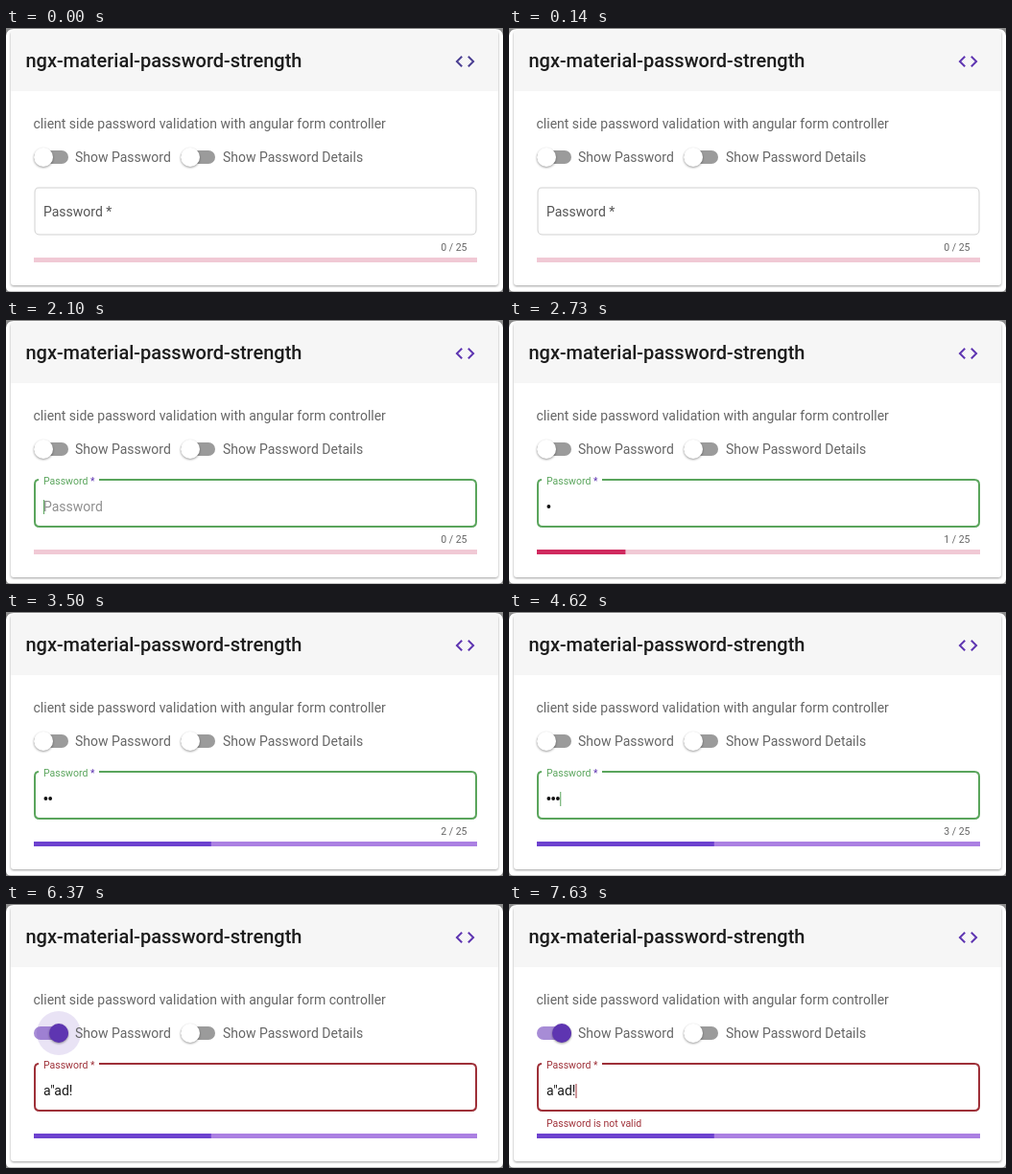
Recreate the animation shown at these times as an HTML page. Size 518 by 276 pixels, loop 8 s.

```html
<!DOCTYPE html>
<html lang="en">
<head>
<meta charset="utf-8">
<title>Password strength</title>
<style>
html, body { margin: 0; width: 100%; height: 100%; overflow: hidden; background: #fff; }
svg { display: block; width: 518px; height: 276px; font: 14px Roboto, Arial, sans-serif; }
.card { filter: drop-shadow(0 1px 1.2px rgba(0,0,0,.38)); }
.thumb { filter: drop-shadow(0 1px 1.2px rgba(0,0,0,.4)); }
.small { font-size: 10.5px; }
.body { fill: #666; }
</style>
</head>
<body>
<svg viewBox="0 0 518 276">
  <rect width="518" height="276" fill="#fff"/>
  <path d="M0 8V0H518V8Q517 1 510 1H8Q1 1 0 8Z" fill="#8c8c8c"/>
  <path d="M0 271V276H518V271Q517.500 275.500 513 275.500H5Q.5 275.500 0 271Z" fill="#8c8c8c"/>
  <rect class="card" x="5" y="3" width="508" height="266" rx="3" fill="#fff"/>
  <path d="M5 66V3H513V66Z" fill="#f6f6f6"/>
  <text x="20.500" y="41" font-size="20" font-weight="500" fill="#1c1c1c">ngx-material-password-strength</text>
  <path id="icon" transform="translate(466.500 23)" d="M9.400 16.600 4.800 12l4.600-4.600L8 6l-6 6 6 6zm5.200 0 4.600-4.600-4.600-4.600L16 6l6 6-6 6z"/>
  <text class="body" x="28.500" y="105">client side password validation with angular form controller</text>

  <rect id="track" x="29" y="128" width="36" height="14" rx="7"/>
  <circle id="ripple" cy="135" fill="#673ab7"/>
  <circle id="thumb" class="thumb" cy="135" r="10"/>
  <text class="body" x="72" y="140">Show Password</text>
  <rect x="182" y="128" width="36" height="14" rx="7" fill="#9b9b9b"/>
  <circle class="thumb" cx="192" cy="135" r="10" fill="#fff"/>
  <text class="body" x="226" y="140">Show Password Details</text>

  <path id="outline" fill="none"/>
  <text id="label">Password<tspan id="star"> *</tspan></text>
  <text id="hintText" x="39" y="200" fill="#8f8f8f">Password</text>
  <g id="dots" fill="#111"></g>
  <text id="plain" x="39" y="200" fill="#1a1a1a">a"ad!</text>
  <rect id="caret" y="188" width="1" height="15"/>
  <text id="count" class="small" x="480.500" y="233" text-anchor="end" fill="#666"></text>
  <text id="error" class="small" x="39" fill="#a0323a">Password is not valid</text>

  <rect id="rail" x="29" y="240" width="462" height="5"/>
  <rect id="bar" x="29" y="240" height="5"/>
</svg>
<script>
const LOOP = 8000, STEP = 70;
const FOCUS = 1707, BLUR = 6230, FLIP = 6280, REFOCUS = 7490;
const KEYS = [2240, 2940, 4550, 4900, 5180];
const CARET_OFF = [[2730, 2940], [3500, 3990], [5740, 6230], [BLUR, REFOCUS]];
const GREEN = [90, 165, 92], RED = [158, 48, 56];
const $ = id => document.getElementById(id);
const set = (id, attrs) => {
  for (const k in attrs) $(id).setAttribute(k, attrs[k]);
};
const show = (id, on) => set(id, { opacity: +on });
const clamp = x => Math.min(1, Math.max(0, x));
const mix = (a, b, p) => a + (b - a) * p;
const rgb = (a, b, p) => `rgb(${a.map((v, i) => Math.round(mix(v, b[i], p)))})`;

function bezier(x1, y1, x2, y2) {
  const at = (a, b, s) => 3 * a * s * (1 - s) ** 2 + 3 * b * s * s * (1 - s) + s ** 3;
  return x => {
    let lo = 0, hi = 1;
    for (let i = 0; i < 20; i++) {
      const m = (lo + hi) / 2;
      if (at(x1, x2, m) < x) lo = m; else hi = m;
    }
    return at(y1, y2, lo);
  };
}
const swift = bezier(.25, .8, .25, 1), ease = bezier(.25, .1, .25, 1);
const run = (t, start, length, curve = swift) => curve(clamp((t - start) / length));

$('dots').innerHTML = KEYS.map((_, i) =>
  `<circle cx="${41.4 + 4.75 * i}" cy="195" r="1.9"/>`).join('');

function drawField(t) {
  const lift = run(t, FOCUS, 400), invalid = t >= BLUR;
  const p = invalid ? run(t, BLUR, 100) : 0;
  const size = mix(14, 10.5, lift);
  const tone = invalid ? rgb(GREEN, RED, p) : rgb([85, 85, 85], GREEN, lift);
  set('label', { x: 39, y: mix(197, 171.5, lift), 'font-size': size, fill: tone });
  set('star', { fill: t > FOCUS && !invalid ? '#5e35b1' : tone });

  const focused = t > FOCUS;
  const top = focused ? 'M97 167H485' : 'M34 167H485';
  set('outline', {
    d: top + 'Q490 167 490 172V211Q490 216 485 216H35Q30 216 30 211V172Q30 167 34 167',
    stroke: invalid ? tone : rgb([208, 208, 208], GREEN, run(t, FOCUS + 60, 250)),
    'stroke-width': mix(1, 2, run(t, FOCUS + 60, 200))
  });
}

function drawInput(t) {
  const n = KEYS.filter(k => t >= k).length, open = t >= FLIP + 40;
  set('hintText', { opacity: n ? 0 : run(t, FOCUS + 133, 260) });
  [...$('dots').children].forEach((c, i) => c.setAttribute('opacity', +(i < n && !open)));
  show('plain', open);
  const hidden = t < FOCUS || CARET_OFF.some(([a, b]) => t >= a && t < b);
  show('caret', !hidden);
  set('caret', {
    x: t >= REFOCUS ? 69.5 : 39 + 4.75 * n,
    fill: t >= REFOCUS ? '#9e3038' : '#5aa55c'
  });
  $('count').textContent = `${n} / 25`;
  show('count', t < BLUR + 70);
  const e = run(t, 6370, 300);
  set('error', { y: mix(223, 233, e), opacity: e });

  const strong = n > 1;
  const share = .2 * run(t, KEYS[0], 260, ease) + .2 * run(t, KEYS[1], 280, ease);
  set('bar', { width: 462 * share, fill: strong ? '#6d42cf' : '#d02a5f' });
  set('rail', { fill: strong ? '#ab80e2' : '#f1c9d5' });
}

function drawSwitch(t) {
  const p = clamp((t - FLIP) / 80), cx = mix(39, 55, p);
  set('track', { fill: rgb([155, 155, 155], [167, 140, 214], p) });
  set('thumb', { cx, fill: rgb([255, 255, 255], [94, 53, 177], p) });
  set('ripple', {
    cx, r: 23 * run(t, BLUR - 40, 150),
    opacity: .14 * (1 - run(t, 6480, 310, ease))
  });
}

function draw(now) {
  const t = Math.floor((now % LOOP) / STEP + .001) * STEP;
  set('icon', { fill: t < 140 ? '#4a3f92' : '#5e35b1' });
  drawField(t);
  drawInput(t);
  drawSwitch(t);
}

const start = performance.now();
(function frame() {
  draw(performance.now() - start);
  requestAnimationFrame(frame);
})();
</script>
</body>
</html>
```
